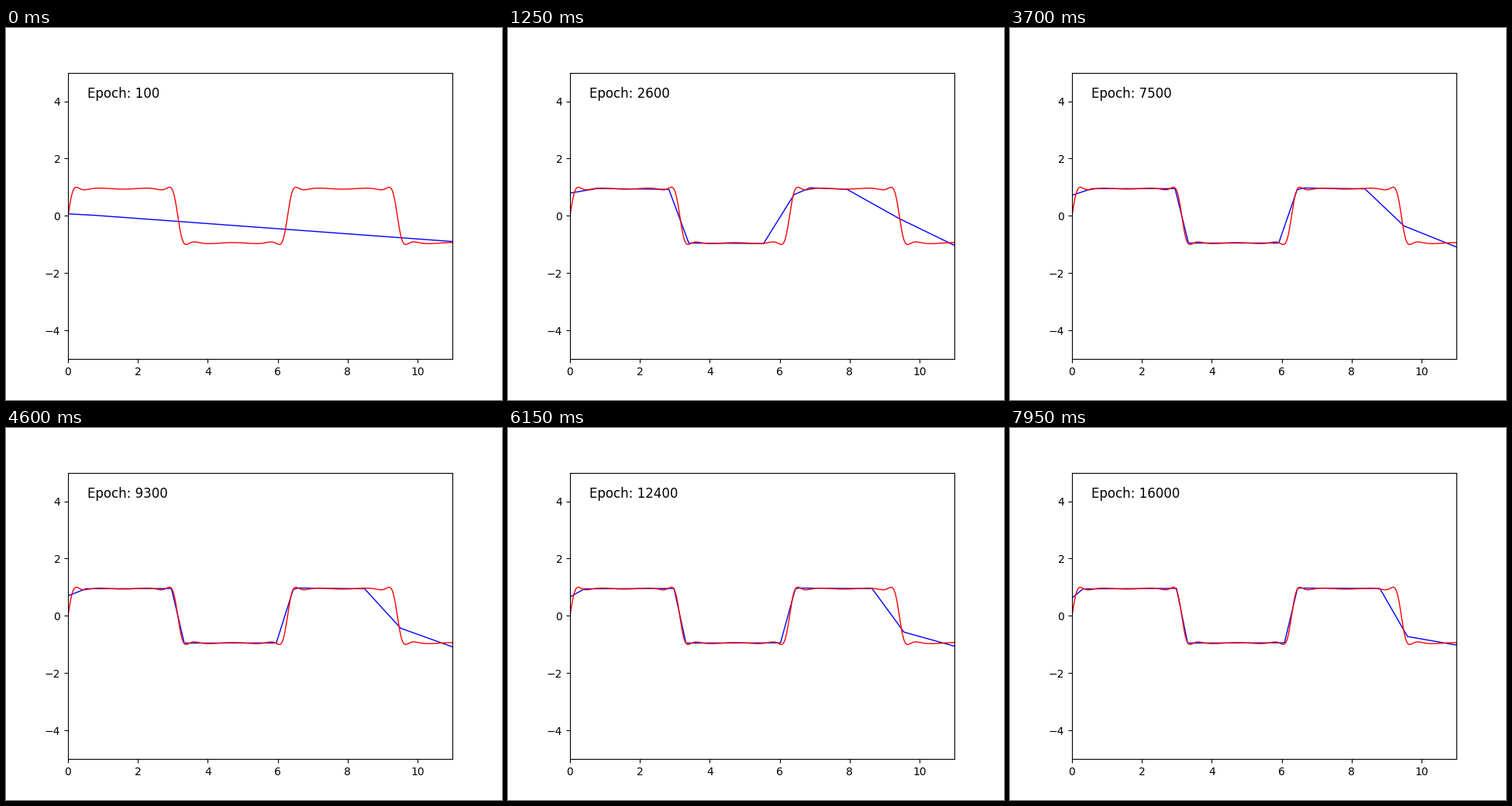
Animation of 640 by 480 pixels, one loop 8 s. Source, as a matplotlib script:

```python
import numpy as np
import matplotlib.pyplot as plt
from matplotlib.animation import FuncAnimation

FRAMES = 160
STEP = 100                       # epochs per frame
X_MAX = 11
FIRST, ROUGH, LAST = 100, 2600, 16000

# Corner of the fit: x and y when roughly learned, x and y at the end,
# and the power that shapes the drift between them (small = fast start).
CORNERS = [
    (0.00, 0.795, 0.00, 0.62, 0.85),
    (0.78, 0.955, 0.31, 0.94, 0.80),
    (2.83, 0.925, 2.99, 0.96, 0.30),
    (3.40, -0.95, 3.31, -0.95, 0.30),
    (5.54, -0.965, 6.08, -0.94, 0.36),
    (6.41, 0.74, 6.45, 0.95, 0.20),
    (6.87, 0.98, 6.50, 0.97, 0.40),
    (7.92, 0.93, 8.81, 0.955, 0.65),
    (9.43, -0.10, 9.60, -0.72, 0.90),
    (X_MAX, -1.03, X_MAX, -1.02, 1.00),
]
x0, y0, x1, y1, power = np.transpose(CORNERS)


def wave(x):
    """Nested sines that approach a square wave."""
    y = np.sin(x)
    for _ in range(3):
        y = np.sin(2 * y)
    return y


def smooth(t):
    t = np.clip(t, 0, 1)
    return t * t * (3 - 2 * t)


def fit_corners(epoch):
    late = np.clip((epoch - ROUGH) / (LAST - ROUGH), 0, 1)
    drift = late ** power
    x = x0 + (x1 - x0) * drift
    y = y0 + (y1 - y0) * drift
    y[-1] -= 0.06 * np.sin(np.pi * late ** 0.7)

    # Early on a sloping line bends into the wave from left to right.
    line = np.minimum(0.07, 0.088 - 0.0894 * x)
    learned = smooth((epoch - FIRST - 150 * x) / 850)
    return x, line + (y - line) * learned


fig, ax = plt.subplots(figsize=(6.4, 4.8), dpi=100)
ax.set_xlim(0, X_MAX)
ax.set_ylim(-5, 5)

grid = np.linspace(0, X_MAX, 1101)
fit, = ax.plot([], [], color="blue", lw=1)
ax.plot(grid, wave(grid), color="red", lw=1)
label = ax.text(0.05, 0.95, "", transform=ax.transAxes, fontsize=12, va="top")


def update(frame):
    epoch = STEP * (frame + 1)
    fit.set_data(*fit_corners(epoch))
    label.set_text(f"Epoch: {epoch}")
    return fit, label


anim = FuncAnimation(fig, update, frames=FRAMES, interval=50,
                     repeat=True, repeat_delay=0)
plt.show()
```
